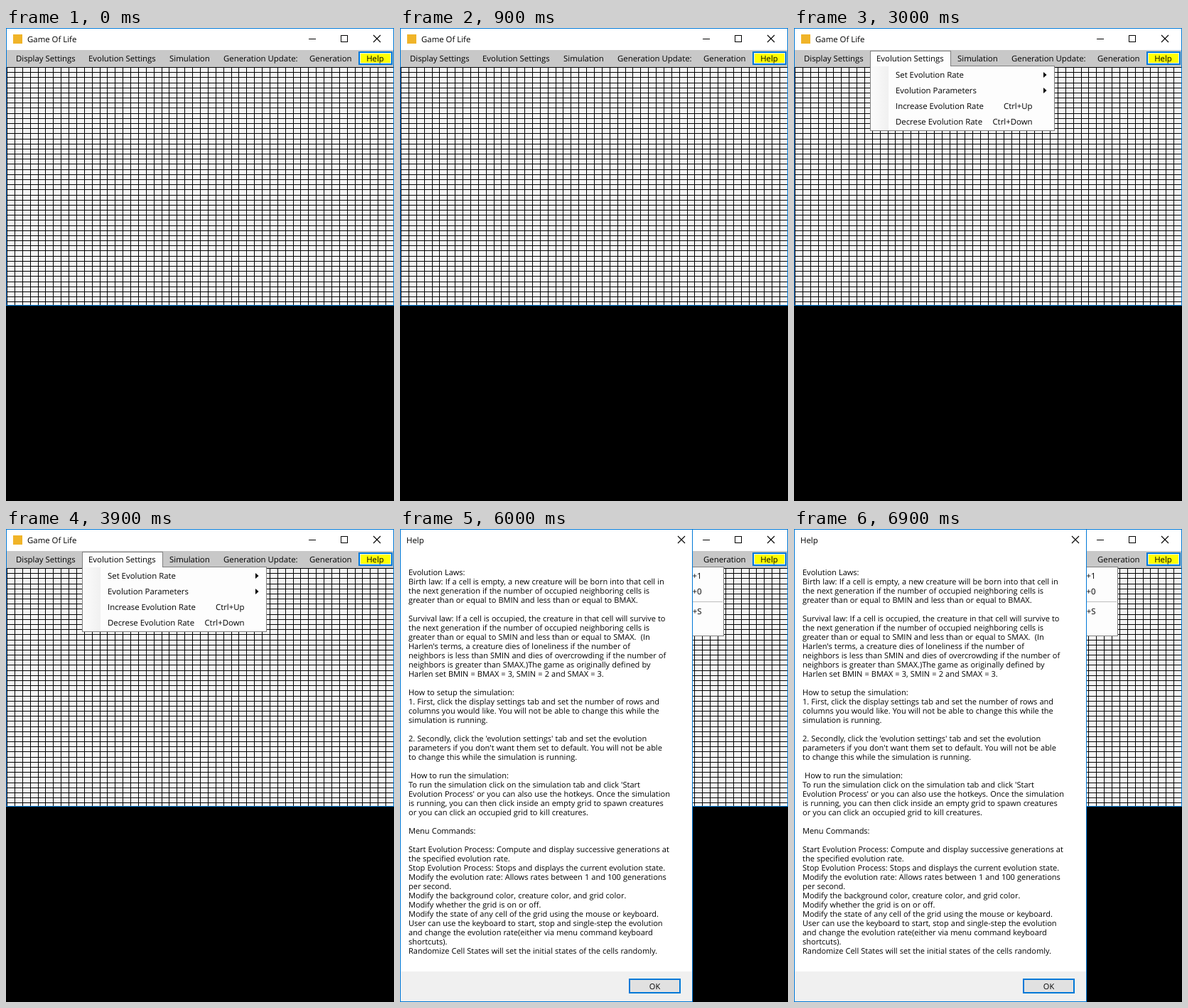
An HTML page that plays this animation: 546x666 px, repeating every 7500 ms.

```html
<!DOCTYPE html>
<html lang="en">
<head>
<meta charset="utf-8">
<title>Game Of Life</title>
<style>
  html, body { margin: 0; width: 100%; height: 100%; overflow: hidden; background: #000; }
  svg { display: block; width: 546px; height: 666px; }
  rect, .crisp { shape-rendering: crispEdges; }
  text {
    font: 11.4px "Open Sans", "Noto Sans", sans-serif;
    text-rendering: geometricPrecision;
    white-space: pre;
    fill: #000;
  }
  .body text { font-size: 11px; word-spacing: .25px; }
</style>
</head>
<body>
<svg id="stage" viewBox="0 0 546 666">
  <defs>
    <linearGradient id="strip">
      <stop offset="0" stop-color="#fcfcfc"/>
      <stop offset="1" stop-color="#f0f0f0"/>
    </linearGradient>
  </defs>
</svg>
<script>
const STEP = 1500;
const BLUE = '#0078d7', GREY = '#808080', PAPER = '#fdfdfd';
const stage = document.getElementById('stage');

const box = (x, y, w, h, fill) =>
  `<rect x="${x}" y="${y}" width="${w}" height="${h}" fill="${fill}"/>`;
const framed = (x, y, w, h, edge, fill, t = 1) =>
  box(x, y, w, h, edge) + box(x + t, y + t, w - 2 * t, h - 2 * t, fill);
const label = (x, y, s, anchor = 'start') =>
  `<text x="${x}" y="${y}" text-anchor="${anchor}">${s}</text>`;
const stroke = (d, w = 1) =>
  `<path d="${d}" fill="none" stroke="#000" stroke-width="${w}"/>`;
const cross = (x, y) => stroke(`M${x} ${y}l10 10m0 -10l-10 10`, 1.1);

function grid() {
  const cols = 50, rows = 50, left = 1, top = 55, w = 544, h = 359;
  let s = box(left, top, w, 335, '#f5f5f5');
  for (let i = 0; i < cols; i++) s += box(Math.round(left + i * w / cols), top, 1, 335, '#000');
  for (let i = 0; i < rows; i++) {
    const y = Math.round(top + i * h / rows);
    if (y < 390) s += box(left, y, w, 1, '#000');
  }
  return s;
}

function mainWindow() {
  const heads = [[14, 'Display Settings'], [116, 'Evolution Settings'], [230, 'Simulation'],
    [306, 'Generation Update:'], [427, 'Generation']];
  return framed(0, 0, 546, 391, BLUE, '#fff')
    + box(10, 9, 13, 13, '#f0b429')
    + label(30, 20, 'Game Of Life')
    + box(426, 15, 10, 1, '#000')
    + framed(471, 10, 10, 10, '#000', '#fff')
    + cross(517, 10)
    + box(1, 31, 544, 24, '#c8c8c8')
    + heads.map(([x, s]) => label(x, 47, s)).join('')
    + framed(496, 33, 48, 19, BLUE, '#e5f1fb', 2)
    + box(499, 36, 42, 13, '#ff0')
    + label(519.5, 47, 'Help', 'middle')
    + grid();
}

// Items: [text, shortcut], 'text>' opens a submenu, '*text' is checked, '-' separates.
function menu(x, headW, w, title, items) {
  const h = 4 + items.reduce((sum, it) => sum + (it === '-' ? 6 : 22), 0);
  let s = framed(x, 53, w, h, GREY, PAPER)
    + framed(x, 32, headW, 22, GREY, PAPER)
    + box(x + 1, 53, headW - 2, 1, PAPER)
    + box(x + 1, 54, 25, h - 2, 'url(#strip)')
    + label(x + 9, 47, title);
  let y = 55;
  for (const it of items) {
    if (it === '-') {
      s += box(x + 33, y + 3, w - 35, 1, '#bdbdbd');
      y += 6;
      continue;
    }
    const [text, keys] = [].concat(it);
    if (text[0] === '*') {
      s += framed(x + 3, y + 1, 28, 20, BLUE, '#b3d7f3')
        + stroke(`M${x + 10} ${y + 6}l2.5 2.5l4.5 -4.5`, 1.6);
    }
    if (text.endsWith('>')) {
      s += `<path d="M${x + w - 16} ${y + 7}l4.5 4l-4.5 4z"/>`;
    }
    s += label(x + 36, y + 15, text.replace(/[*>]/g, ''));
    if (keys) s += label(x + w - 31.5, y + 15, keys, 'end');
    y += 22;
  }
  return s;
}

const help = `Evolution Laws:
Birth law: If a cell is empty, a new creature will be born into that cell in
the next generation if the number of occupied neighboring cells is
greater than or equal to BMIN and less than or equal to BMAX.

Survival law: If a cell is occupied, the creature in that cell will survive to
the next generation if the number of occupied neighboring cells is
greater than or equal to SMIN and less than or equal to SMAX.  (In
Harlen's terms, a creature dies of loneliness if the number of
neighbors is less than SMIN and dies of overcrowding if the number of
neighbors is greater than SMAX.)The game as originally defined by
Harlen set BMIN = BMAX = 3, SMIN = 2 and SMAX = 3.

How to setup the simulation:
1. First, click the display settings tab and set the number of rows and
columns you would like. You will not be able to change this while the
simulation is running.

2. Secondly, click the 'evolution settings' tab and set the evolution
parameters if you don't want them set to default. You will not be able
to change this while the simulation is running.

 How to run the simulation:
To run the simulation click on the simulation tab and click 'Start
Evolution Process' or you can also use the hotkeys. Once the simulation
is running, you can then click inside an empty grid to spawn creatures
or you can click an occupied grid to kill creatures.

Menu Commands:

Start Evolution Process: Compute and display successive generations at
the specified evolution rate.
Stop Evolution Process: Stops and displays the current evolution state.
Modify the evolution rate: Allows rates between 1 and 100 generations
per second.
Modify the background color, creature color, and grid color.
Modify whether the grid is on or off.
Modify the state of any cell of the grid using the mouse or keyboard.
User can use the keyboard to start, stop and single-step the evolution
and change the evolution rate(either via menu command keyboard
shortcuts).
Randomize Cell States will set the initial states of the cells randomly.`;

function dialog() {
  const lines = help.split('\n').map((s, i) => label(12, 65 + 13 * i, s)).join('');
  return framed(0, 0, 412, 666, BLUE, '#fff')
    + label(9, 20, 'Help')
    + cross(391, 10)
    + box(1, 623, 410, 42, '#f0f0f0')
    + framed(322, 633, 73, 21, BLUE, '#e1e1e1', 2)
    + `<g class="body">${lines}${label(358.5, 648, 'OK', 'middle')}</g>`;
}

// Each layer is visible from its first step up to its last.
const layers = [
  [0, 4, mainWindow()],
  [1, 1, menu(5, 102, 190, 'Display Settings', ['Rows>', 'Columns>', '-',
    '*Toggle Grid On/Off', 'Clear Grid', '-',
    'Set Background Color', 'Set Grid Color', 'Set Creature Color'])],
  [2, 2, menu(107, 114, 260, 'Evolution Settings', ['Set Evolution Rate>', 'Evolution Parameters>',
    ['Increase Evolution Rate', 'Ctrl+Up'], ['Decrese Evolution Rate', 'Ctrl+Down']])],
  [3, 4, menu(221, 76, 235, 'Simulation', [['Start Evolution Process', 'Ctrl+1'],
    ['Stop Evolution Process', 'Ctrl+0'], '-',
    ['Single-Step Evolution', 'Ctrl+S'], 'Randomize Cell States'])],
  [4, 4, dialog()]
].map(([from, to, html]) => {
  const g = document.createElementNS('http://www.w3.org/2000/svg', 'g');
  g.innerHTML = html;
  stage.append(g);
  return { from, to, g };
});

const start = performance.now();
function draw() {
  const step = Math.floor((performance.now() - start) / STEP) % 5;
  for (const { from, to, g } of layers) {
    g.style.display = step >= from && step <= to ? '' : 'none';
  }
  requestAnimationFrame(draw);
}
draw();
</script>
</body>
</html>
```
